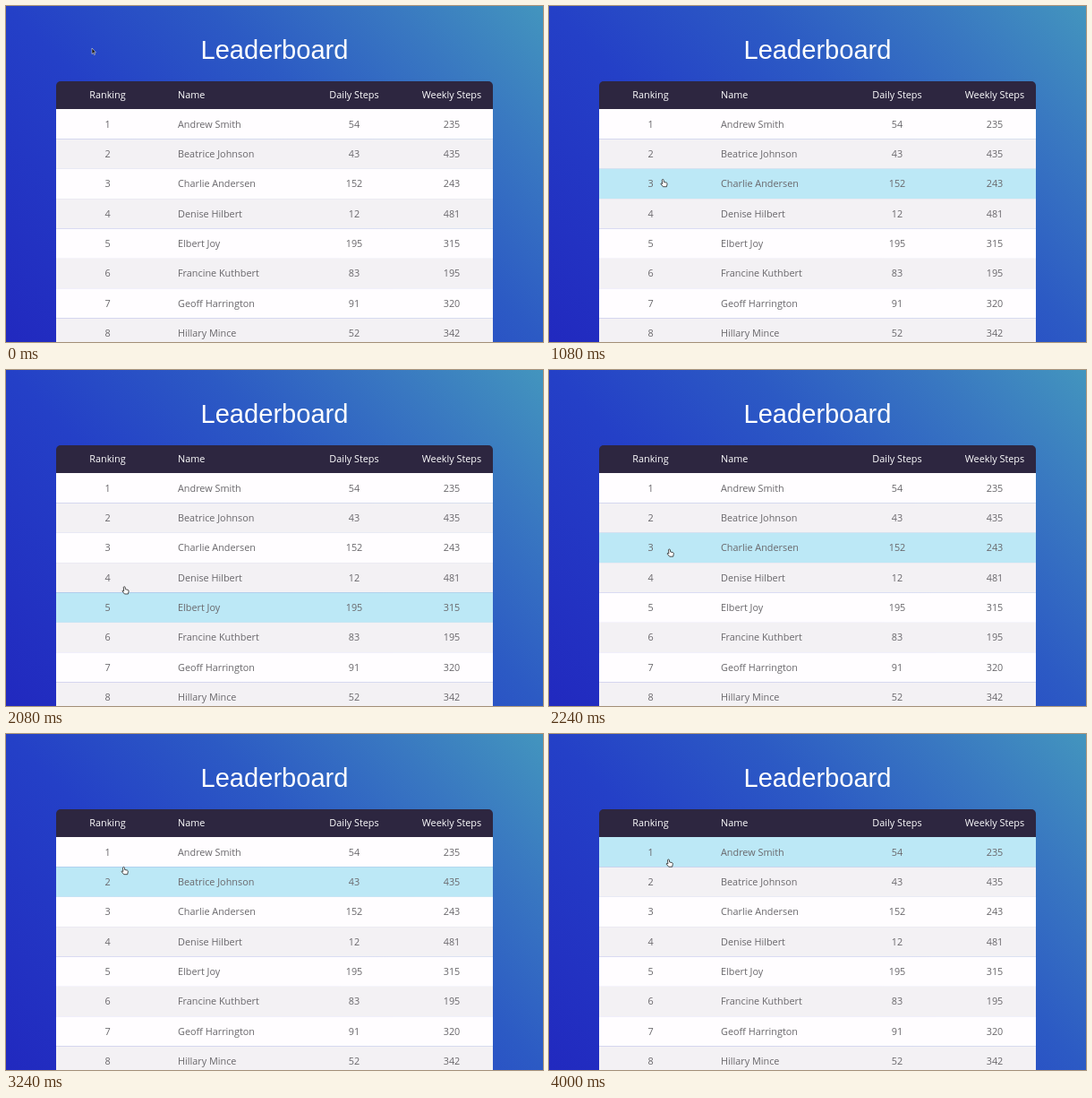
Animation of 600x375 px, one loop 4440 ms. Source, as an HTML page:

```html
<!DOCTYPE html>
<html lang="en">
<head>
<meta charset="utf-8">
<title>Leaderboard</title>
<style>
  html, body { margin: 0; width: 100%; height: 100%; overflow: hidden; }
  body {
    background: linear-gradient(45deg, #2129bf 0%, #2440c7 38.5%, #2c5ac4 61.5%, #3978c1 82%, #4395be 100%);
  }
  svg { display: block; width: 600px; height: 375px; }
  text { font: 10.85px "Open Sans", sans-serif; fill: #69676b; }
  .mid { text-anchor: middle; }
  .head text { fill: #fff; font-weight: 500; }
  .title { font: 29.1px "Liberation Sans", Arial, sans-serif; fill: #fff; }
  .row rect { fill: #fffdff; }
  .row:nth-child(even) rect { fill: #f3f1f4; }
  .row.on rect { fill: #bce8f6; }
  #arrow { fill: #111; stroke: #fff; stroke-width: .5; }
  #hand { fill: #fff; stroke: #222; stroke-width: .8; stroke-linejoin: round; }
</style>
</head>
<body>
<svg viewBox="0 0 600 375">
  <text class="title mid" x="300" y="59.3">Leaderboard</text>
  <path d="M56 116V89a5 5 0 0 1 5-5H539a5 5 0 0 1 5 5V116Z" fill="#2d2640"/>
  <g class="head" id="head"></g>
  <g id="rows"></g>
  <g id="cursor">
    <path id="arrow" d="M0 0V6.6L1.5 5.2 2.5 7.6 3.5 7.2 2.5 4.8H4.4Z"/>
    <path id="hand" d="M-1 .8Q-.9 0 0 0 .8 0 .9.8L1.2 3 4 3.6Q5 4 4.8 5.2L4.2 8.2H.2L-2.3 5.2Q-2.4 4.2-1.4 4.4L-.6 5Z"/>
  </g>
</svg>
<script>
const LOOP = 4440, STEP = 40, TOP = 115, ROW = 33.35;
const people = [
  ["Andrew Smith", 54, 235],
  ["Beatrice Johnson", 43, 435],
  ["Charlie Andersen", 152, 243],
  ["Denise Hilbert", 12, 481],
  ["Elbert Joy", 195, 315],
  ["Francine Kuthbert", 83, 195],
  ["Geoff Harrington", 91, 320],
  ["Hillary Mince", 52, 342]
];
// Pointer path: time, x, y
const path = [
  [0, 96, 47], [360, 122, 160], [520, 126, 142], [600, 126, 141],
  [680, 127, 149.7], [880, 128, 172], [960, 128, 183], [1120, 127, 197],
  [1400, 124, 216], [1680, 121, 246], [1720, 121, 247], [1880, 126, 270],
  [2060, 132, 247], [2240, 134.5, 200], [2400, 134, 196], [2520, 134, 196],
  [2720, 133, 209], [3000, 130.5, 182.3], [3200, 131, 153], [3280, 132, 144],
  [3360, 132, 144], [3480, 133.5, 156], [3640, 134, 152], [3680, 134, 152],
  [3760, 134, 146], [4000, 133.5, 140], [LOOP, 133.5, 140]
];

const $ = id => document.getElementById(id);

function add(parent, tag, attrs, content = "") {
  const el = document.createElementNS("http://www.w3.org/2000/svg", tag);
  for (const key in attrs) el.setAttribute(key, attrs[key]);
  el.textContent = content;
  return parent.appendChild(el);
}

function addCells(parent, y, cells) {
  [113.5, 192, 389, 498].forEach((x, i) =>
    add(parent, "text", { x, y, class: i === 1 ? "" : "mid" }, cells[i]));
}

addCells($("head"), 103.4, ["Ranking", "Name", "Daily Steps", "Weekly Steps"]);
const rows = people.map((person, i) => {
  const y = TOP + i * ROW;
  const row = add($("rows"), "g", { class: "row" });
  add(row, "rect", { x: 56, y, width: 488, height: ROW + .2 });
  addCells(row, y + 20.5, [i + 1, ...person]);
  return row;
});

function pointer(t) {
  const i = Math.max(1, path.findIndex(p => p[0] >= t));
  const [t0, x0, y0] = path[i - 1], [t1, x1, y1] = path[i];
  const k = (t - t0) / (t1 - t0);
  return [x0 + (x1 - x0) * k, y0 + (y1 - y0) * k];
}

function draw(now) {
  const t = Math.floor((now % LOOP) / STEP) * STEP;
  const [x, y] = pointer(t);
  // The highlight trails the pointer by one step
  const hover = Math.floor((pointer(Math.max(0, t - STEP))[1] - TOP) / ROW);
  rows.forEach((row, i) => row.classList.toggle("on", i === hover));
  const plain = hover < 0 || (t >= 1640 && t < 1800);
  $("arrow").style.display = plain ? "" : "none";
  $("hand").style.display = plain ? "none" : "";
  $("cursor").setAttribute("transform", `translate(${x} ${y})`);
}

let start;
function tick(now) {
  start ??= now;
  draw(now - start);
  requestAnimationFrame(tick);
}
draw(0);
requestAnimationFrame(tick);
</script>
</body>
</html>
```
